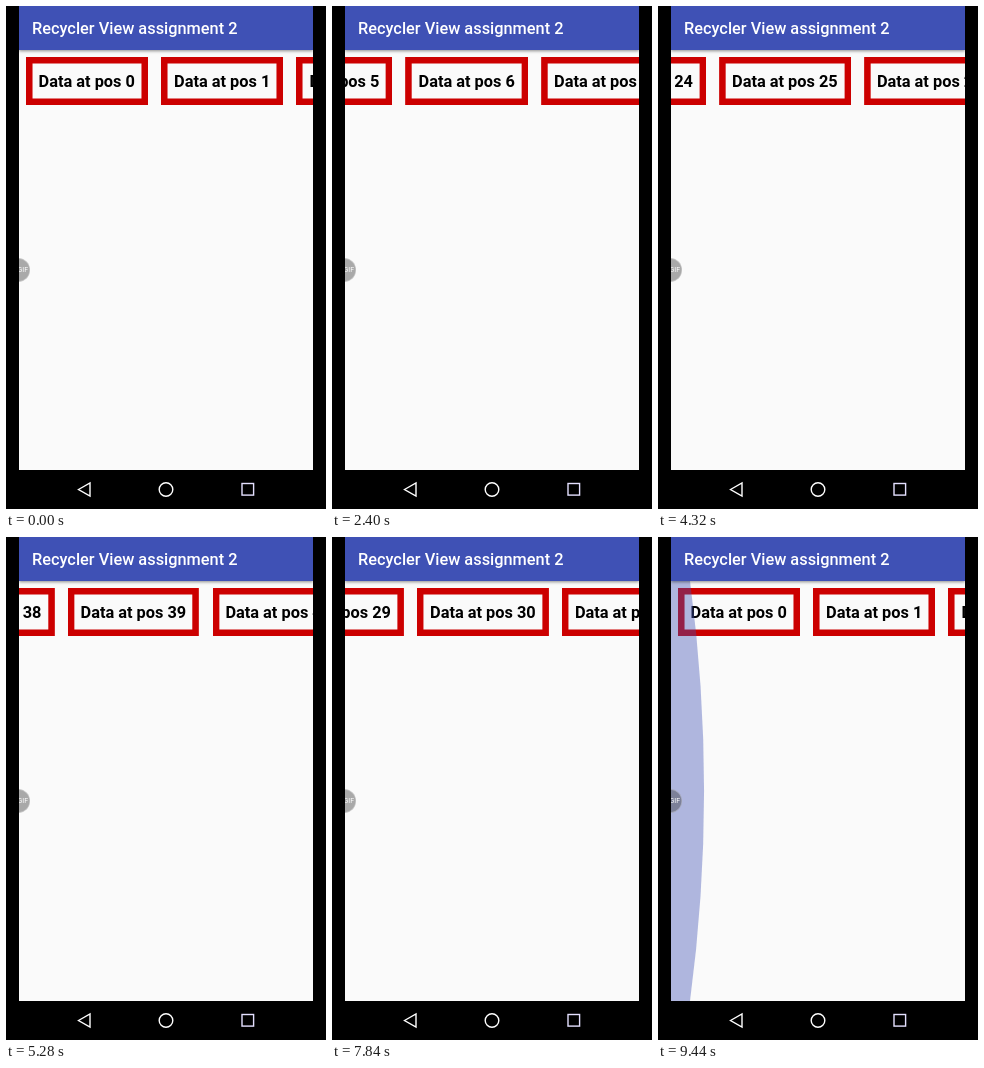
Recreate the animation shown at these times as an HTML page. Size 320 by 503 pixels, loop 9600 ms.

```html
<!DOCTYPE html>
<html lang="en">
<head>
<meta charset="utf-8">
<title>Horizontal list</title>
<style>
html, body { margin: 0; width: 100%; height: 100%; overflow: hidden; background: #000; }
#screen {
  position: absolute; left: 13px; top: 0; width: 294px; height: 464px;
  overflow: hidden; background: #fafafa;
  font-family: Roboto, sans-serif; font-size: 16.33px; white-space: nowrap;
}
#bar {
  position: absolute; left: 0; top: 0; width: 281px; height: 44px; padding-left: 13px;
  line-height: 45px; font-weight: 500; color: #fff; background: #3f51b5;
  box-shadow: 0 1px 3px rgba(0, 0, 0, .45);
}
#row { position: absolute; left: 0; top: 51px; display: flex; }
.item {
  flex: none; box-sizing: border-box; height: 48px; margin: 0 6.53px; padding: 14px 13.07px 0;
  line-height: 22px; font-weight: 700; color: #000;
  box-shadow: inset 0 0 0 6.53px #c00;
}
#glow { position: absolute; left: 0; top: 44px; width: 294px; height: 420px; visibility: hidden; }
#badge {
  position: absolute; left: -13px; top: 252px; width: 24px; height: 24px; border-radius: 50%;
  background: rgba(48, 48, 48, .4); box-shadow: inset 0 0 0 .6px rgba(255, 255, 255, .35);
  font-size: 7px; line-height: 24px; color: #fff;
}
#badge span { position: absolute; right: 2px; }
#nav { position: absolute; left: 0; top: 464px; }
</style>
</head>
<body>
<div id="screen">
  <div id="row"></div>
  <svg id="glow" viewBox="0 0 294 420"><path d="M0 0H19A1582 1582 0 0 1 19 420H0Z" fill="#3f51b5" fill-opacity=".4"/></svg>
  <div id="bar">Recycler View assignment 2</div>
  <div id="badge"><span>GIF</span></div>
</div>
<svg id="nav" width="320" height="39" fill="none" stroke="#fff" stroke-width="1.4">
  <path d="M72.5 19.5L84 13V26Z"/>
  <circle cx="160" cy="19.5" r="6.8"/>
  <rect x="236" y="13.5" width="11.6" height="11.6" stroke="#e4e0ff"/>
</svg>
<script>
const LOOP = 9600, TICK = 160, COUNT = 50;
const row = document.getElementById('row');
const glow = document.getElementById('glow');

for (let i = 0; i < COUNT; i++) {
  const item = document.createElement('div');
  item.className = 'item';
  item.textContent = 'Data at pos ' + i;
  row.append(item);
}
const lefts = [...row.children].map(el => el.getBoundingClientRect().left);

// time, item index, left edge of that item on the stage
const keys = [
  [1280, 0, 19.53], [2400, 6, 73.5], [3200, 16, 109], [4320, 25, 61],
  [6240, 49, 169], [6400, 49, 169], [7840, 30, 85], [9440, 0, 19.53]
].map(([time, item, x]) => ({ time, pos: lefts[item] - x }));

const slopes = keys.slice(1).map((k, i) => (k.pos - keys[i].pos) / (k.time - keys[i].time));

// Harmonic mean keeps the curve from overshooting
const tangents = keys.map((_, i) => {
  if (i === 0) return 0;
  if (i === slopes.length) return slopes[i - 1];
  const a = slopes[i - 1], b = slopes[i];
  return a * b > 0 ? 2 * a * b / (a + b) : 0;
});

function scrollAt(t) {
  if (t < 1440) return 0;
  let i = 0;
  while (i < keys.length - 2 && t >= keys[i + 1].time) i++;
  const a = keys[i], b = keys[i + 1], span = b.time - a.time;
  const u = Math.min(1, (t - a.time) / span), v = 1 - u;
  return a.pos * v * v * (1 + 2 * u) + b.pos * u * u * (3 - 2 * u)
    + span * u * v * (tangents[i] * v - tangents[i + 1] * u);
}

function draw() {
  const t = Math.floor((performance.now() % LOOP) / TICK) * TICK;
  row.style.transform = `translateX(${-scrollAt(t).toFixed(2)}px)`;
  glow.style.visibility = t >= 9440 ? 'visible' : 'hidden';
  requestAnimationFrame(draw);
}
draw();
</script>
</body>
</html>
```
